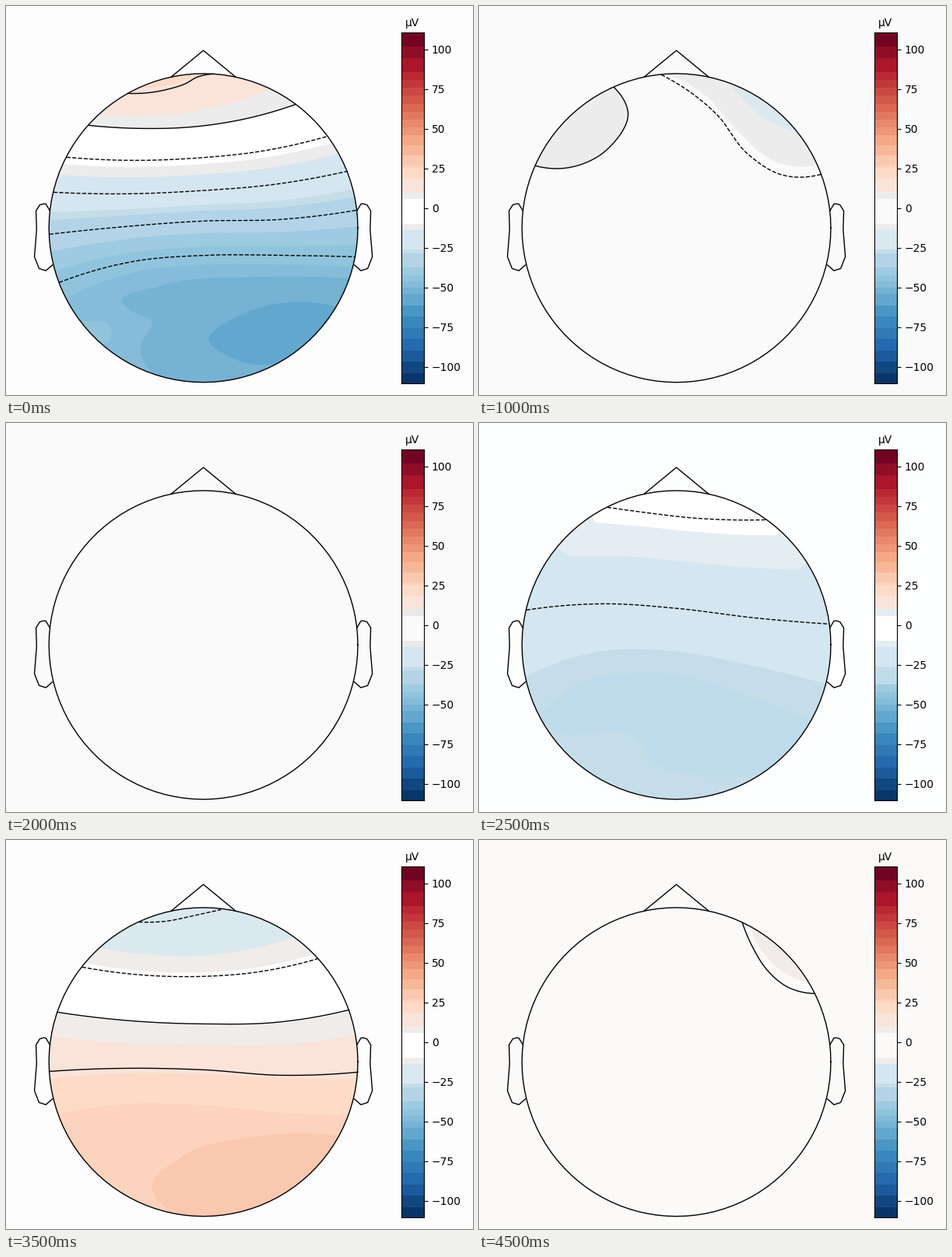
These frames come from a looping animation (600x500 px, 5 s). A matplotlib script:

```python
import numpy as np
import matplotlib.pyplot as plt
from matplotlib.animation import FuncAnimation
from matplotlib.patches import Circle, Polygon, Rectangle

W, H, DPI = 600, 500, 100
CX, CY, R = 253.6, 285.3, 198.4

fig = plt.figure(figsize=(W / DPI, H / DPI), dpi=DPI)
ax = fig.add_axes([0, 0, 1, 1])
ax.set_xlim(0, W)
ax.set_ylim(H, 0)
ax.axis("off")

# ---- head outline -------------------------------------------------------
head = Circle((CX, CY), R, ec="none", zorder=1)
ax.add_patch(head)


def outline(x, y):
    ax.plot(CX + R * np.asarray(x), CY - R * np.asarray(y), color="k", lw=1, zorder=5)


turn = np.linspace(0, 2 * np.pi, 101)
outline(np.cos(turn), np.sin(turn))
nose_x = np.radians(12)
nose_y = np.sqrt(1 - nose_x ** 2)
outline([-nose_x, 0, nose_x], [nose_y, 1.15, nose_y])
ear_x = 2 * np.array([.497, .510, .518, .5299, .5419, .54, .547, .532, .510, .489])
ear_y = 2 * np.array([.0555, .0775, .0783, .0746, .0555, -.0055, -.0932, -.1313, -.1384, -.1199])
outline(ear_x, ear_y)
outline(-ear_x, ear_y)

# ---- colour bar ---------------------------------------------------------
TOP, BOTTOM, ZERO, SCALE = 34, 485, 259.7, 2.04
bar = fig.add_axes([508 / W, 1 - BOTTOM / H, 29 / W, (BOTTOM - TOP) / H])
bar.set_xlim(0, 1)
bar.set_ylim(BOTTOM, TOP)
bar.set_xticks([])
bar.yaxis.tick_right()
volts = range(100, -101, -25)
bar.set_yticks([ZERO - SCALE * v for v in volts],
               [str(v).replace("-", "\u2212") for v in volts])
bar.tick_params(labelsize=10)
bar.set_title("\u00b5V", fontsize=10, x=0.48)

edges = np.r_[34, 52, 67, np.linspace(85, 166, 9), 179, 192, 205, 209, 222, 239,
              248, 280, 288, 313, 318, 336, 346, 354, 362, np.linspace(370, 486, 9)]
levels = (ZERO - edges) / SCALE
bands = []
for a, b in zip(edges, edges[1:]):
    tone = plt.cm.RdBu_r(0.5 + (ZERO - (a + b) / 2) / (BOTTOM - TOP))
    bands.append(bar.add_patch(Rectangle((0, a), 1, b - a, fc=tone, ec="none",
                                         antialiased=False)))


def band(level):
    return bands[np.searchsorted(edges, ZERO - SCALE * level, "right") - 1]


# ---- drawing helpers ----------------------------------------------------
parts = []


def trace(*nums):
    """Hermite curve through x, y pairs, parametrised by chord length."""
    p = np.array(nums, float).reshape(-1, 2) + 0.4
    s = np.r_[0, np.cumsum(np.hypot(*np.diff(p, axis=0).T))]
    m = np.gradient(p, s, axis=0, edge_order=2)
    t = np.linspace(0, s[-1], 160)
    i = np.clip(np.searchsorted(s, t, "right") - 1, 0, len(s) - 2)
    h = (s[i + 1] - s[i])[:, None]
    u = (t - s[i])[:, None] / h
    return ((2 * u**3 - 3 * u**2 + 1) * p[i] + (u**3 - 2 * u**2 + u) * h * m[i]
            + (3 * u**2 - 2 * u**3) * p[i + 1] + (u**3 - u**2) * h * m[i + 1])


def row(*ys):
    """Curve from rim to rim through heights at evenly spaced x."""
    half = [np.sqrt(R**2 - (y - CY)**2) for y in (ys[0], ys[-1])]
    xs = np.linspace(CX - half[0], CX + half[1], len(ys))
    return trace(*np.c_[xs, ys].ravel())


def patch(level, curve):
    """Fill the part of the head clockwise from the curve's end to its start."""
    a0, a1 = (np.arctan2(y - CY, x - CX) for x, y in (curve[-1], curve[0]))
    a = np.linspace(a0, a1 + 2 * np.pi * (a1 < a0), 60)
    rim = np.c_[CX + 1.2 * R * np.cos(a), CY + 1.2 * R * np.sin(a)]
    shape = Polygon(np.r_[curve, rim], fc=band(level).get_facecolor(), ec="none", zorder=2)
    ax.add_patch(shape)
    shape.set_clip_path(head)
    parts.append(shape)


def line(level, curve):
    parts.extend(ax.plot(*curve.T, color="k", lw=1, zorder=4,
                         ls="-" if level > 0 else "--"))


def field(*isos):
    """Fill colour bands between (level, curve[, drawn]) isolines."""
    first, last = isos[0][0], isos[-1][0]
    step = np.sign(last - first)
    head.set_facecolor(band(first).get_facecolor())
    for lo, hi in zip(isos, isos[1:]):
        for v in sorted(levels, key=lambda v: step * v):
            f = (v - lo[0]) / (hi[0] - lo[0])
            if 0 <= f < 1:
                patch(v + 0.1 * step, lo[1] + f * (hi[1] - lo[1]))
    for level, curve, *drawn in isos:
        if drawn:
            line(level, curve)


def setup(bg, neutral="#ececec", white="white", cool="#d4e6f0", deep="#b3d4e6"):
    fig.set_facecolor(bg)
    head.set_facecolor(white)
    for level, color in ((8, neutral), (-12, neutral), (0, white), (-20, cool),
                         (-33, deep), (-27, "#c4dde9"), (15, "#fae3d8")):
        band(level).set_facecolor(color)


# ---- scalp maps ---------------------------------------------------------
def back_negative():
    setup("#fdfdfd")
    field((18.7, trace(172, 102, 215, 97, 243, 88)),
          (18, trace(156, 112, 210, 106, 231, 99, 243, 92, 266, 87), 1),
          (10.1, row(139, 141, 137, 125, 107)),
          (5.7, row(153, 157, 155, 145, 126), 1),
          (-7.5, row(194, 198, 195, 186, 167), 1),
          (-20, row(239, 241, 237, 229, 212), 1),
          (-33, row(293, 283, 276, 274, 262), 1),
          (-45.5, row(355, 328, 320, 320, 322), 1),
          (-46.4, row(380, 344, 335, 335, 338)))
    patch(-52, trace(189, 472, 172, 440, 187, 405, 158, 390, 149, 381,
                     200, 359, 320, 348, 441, 350))
    patch(-57, trace(350, 459, 290, 452, 260, 430, 310, 393, 380, 380, 424, 386))
    patch(-44, trace(96, 405, 135, 417, 133, 430, 122, 434))


def right_front_negative():
    setup("#fdfdfd", "#f4ece9")
    field((-33, trace(288, 91, 340, 121, 387, 139), 1),
          (-21, trace(216, 91, 275, 125, 340, 169, 375, 184, 426, 186), 1),
          (-9.5, trace(186, 101, 250, 149, 330, 207, 385, 231, 443, 229), 1),
          (5.5, trace(149, 117, 200, 182, 290, 238, 395, 279, 452, 276), 1),
          (10.2, trace(118, 142, 165, 211, 250, 262, 360, 292, 450, 304)),
          (17, trace(81, 381, 120, 342, 180, 329, 290, 333, 443, 343), 1),
          (18.6, trace(94, 403, 145, 358, 230, 342, 443, 348)))
    patch(25.5, trace(331, 466, 268, 448, 262, 425, 320, 403, 412, 400))


def front_split():
    setup("#fafafa", white="#fafafa", cool="#dae8ef")
    field((-7.5, trace(439, 216, 390, 217, 345, 190, 305, 139, 234, 88), 1),
          (-10, trace(435, 204, 385, 201, 330, 158, 290, 114, 244, 88)),
          (-14, trace(407, 160, 360, 138, 326, 101)))
    left = trace(173, 104, 191, 136, 162, 186, 110, 208, 72, 205)
    patch(8, left)
    line(8, left)


def mild_negative():
    setup("#fdfdfd")
    field((-8.2, row(149, 157, 162, 162, 152), 1),
          (-20, row(327, 307, 310, 318, 331), 1))


def silent():
    setup("#fafafa", "#e9e9e9", "#fafafa")


def broad_negative():
    setup("#fdfefe", "#e4edf2", deep="#bddbeb")
    field((-8.2, row(108, 115, 121, 124, 124), 1),
          (-20, row(240, 232, 238, 250, 258), 1),
          (-26.2, row(327, 294, 294, 312, 336)))
    patch(-30, trace(362, 450, 290, 453, 225, 436, 202, 404, 95, 394, 80, 383,
                     115, 343, 215, 321, 358, 356, 427, 383))


def turning_positive():
    setup("#fdfdfd", "#f0ece9", cool="#dae8f0")
    field((5.5, row(241, 251, 254, 252, 240), 1),
          (10.2, row(286, 284, 288, 292, 285)),
          (17.3, row(352, 341, 343, 351, 354), 1),
          (18.6, row(380, 362, 366, 373, 378)))


def back_positive():
    setup("#fdfdfd", "#f0ece9", cool="#dae8f0")
    field((-20, trace(170, 105, 205, 104, 240, 97, 276, 89), 1),
          (-14, row(138, 146, 148, 140, 124)),
          (-9, row(163, 173, 175, 169, 152), 1),
          (5.5, row(221, 232, 236, 234, 218), 1),
          (10.2, row(253, 261, 263, 263, 251)),
          (17.3, row(297, 293, 295, 302, 298), 1),
          (18.6, row(307, 300, 301, 306, 308)),
          (24.9, row(352, 339, 341, 350, 354)))
    patch(28, trace(209, 476, 187, 445, 225, 407, 320, 381, 430, 380))


def fading_positive():
    setup("#fdfdfd", "#f4ece9")
    field((5.5, row(172, 186, 190, 185, 171), 1),
          (10.2, row(250, 252, 254, 254, 244)),
          (17.3, row(352, 342, 346, 352, 354), 1))


def right_front_positive():
    setup("#fbfaf8", "#f2ece9", "#fbfaf8")
    field((5.5, trace(431, 197, 395, 188, 370, 167, 352, 139, 338, 106), 1),
          (5.75, trace(421, 182, 380, 160, 348, 112)))


maps = [back_negative, right_front_negative, front_split, mild_negative, silent,
        broad_negative, turning_positive, back_positive, fading_positive,
        right_front_positive]


def draw(i):
    for part in parts:
        part.remove()
    parts.clear()
    maps[i % len(maps)]()
    return []


anim = FuncAnimation(fig, draw, frames=len(maps), interval=500,
                     init_func=lambda: [], repeat=True, repeat_delay=0,
                     blit=False)
plt.show()
```
